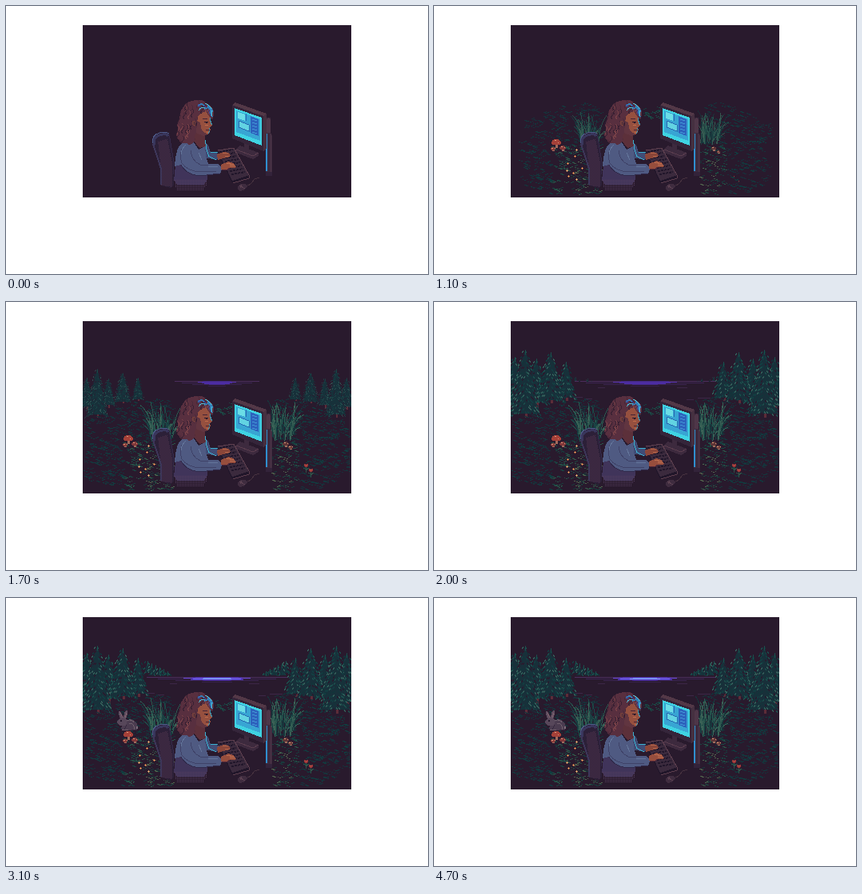
Write an HTML page that moves like this. It is 528x336 px and loops after 4.8 s.

```html
<!DOCTYPE html>
<html lang="en">
<head>
<meta charset="utf-8">
<title>Night work in the forest</title>
<style>
  html, body { margin: 0; width: 100%; height: 100%; overflow: hidden; background: #fff; }
  svg { display: block; width: 528px; height: 336px; }
</style>
</head>
<body>
<svg id="stage" viewBox="0 0 528 336" shape-rendering="crispEdges" fill="none">
  <defs>
    <clipPath id="panel"><path d="M96 24h336v216h-336z"/></clipPath>
    <clipPath id="hairClip"><path id="hairShape" d="M239 118C231 118 223 122 221 128C216 133 219 139 216 144C212 150 217 154 214 159C211 165 217 167 218 171C223 174 226 170 229 174C236 173 237 168 236 163C240 158 237 152 239 148L240 139L244 134L250 132L257 142L259 140C262 133 259 127 254 124C249 119 245 117 239 118Z"/></clipPath>
    <pattern id="mesh" width="2" height="2" patternUnits="userSpaceOnUse">
      <path d="M0 0h1v1h-1zM1 1h1v1h-1z" fill="#4a3049"/>
    </pattern>
    <pattern id="fade" width="2" height="2" patternUnits="userSpaceOnUse">
      <path d="M0 0h1v1h-1z" fill="#57405f"/>
    </pattern>
  </defs>
  <g id="scene" clip-path="url(#panel)">
    <path d="M96 24h336v216h-336z" fill="#291a2d"/>
  </g>
</svg>
<script>
const LOOP = 4800, STEP = 100, MID = 264;
const scene = document.getElementById('scene');
const movers = [];

function add(tag, attrs, parent = scene) {
  const node = document.createElementNS('http://www.w3.org/2000/svg', tag);
  for (const key in attrs) node.setAttribute(key, attrs[key]);
  parent.appendChild(node);
  return node;
}
const group = (parent) => add('g', {}, parent);
const fill = (d, color, parent) => add('path', { d, fill: color }, parent);
const line = (d, color, parent, width = 1) =>
  add('path', { d, stroke: color, 'stroke-width': width }, parent);

let seed = 71;
function random(lo = 0, hi = 1) {
  seed = (seed * 16807) % 2147483647;
  return lo + (hi - lo) * seed / 2147483647;
}
const pick = (list) => list[Math.floor(random(0, list.length))];
const progress = (step, from, to) => Math.min(1, Math.max(0, (step - from) / (to - from)));

function reveal(node, from) {
  movers.push(step => node.setAttribute('display', step >= from ? 'inline' : 'none'));
  return node;
}
function grow(node, x, y, from, to) {
  movers.push(step => {
    const k = progress(step, from, to);
    node.setAttribute('display', k > 0 ? 'inline' : 'none');
    node.setAttribute('transform', `translate(${x} ${y}) scale(${k}) translate(${-x} ${-y})`);
  });
}
function shift(node, at) {
  movers.push(step => node.setAttribute('transform', `translate(${at(step)})`));
  return node;
}

// Lake light rows: [y, half width, colour]
function drawLake() {
  const band = (rows, spread, from) => {
    const parent = reveal(group(), from);
    for (const [y, half, color] of rows) {
      const bar = add('rect', { y, height: 1, fill: color }, parent);
      movers.push(step => {
        const ripple = half < 45 && step > 23 ? (step + y) % 3 : 0;
        const width = Math.round(half * spread(step)) + ripple;
        bar.setAttribute('x', MID - width);
        bar.setAttribute('width', width * 2);
      });
    }
  };
  const open = step => progress(step, 14, 19);
  band([[99, 88, '#4b2e5c'], [101, 74, '#3c2553'], [103, 52, '#3a2450'], [105, 18, '#352148']], open, 15);
  band([[99, 30, '#45298a'], [100, 40, '#4c2d9a'], [101, 32, '#4c2da5'], [102, 26, '#4c2da5'], [103, 16, '#45298a']], open, 16);
  band([[99, 26, '#5335a5'], [100, 40, '#6143c6'], [101, 30, '#6d64ee'], [102, 32, '#523ac2'], [103, 14, '#4b3195']],
    step => .55 + .45 * progress(step, 21, 24), 21);
  band([[100, 15, '#6f80ff'], [101, 18, '#86a4ff']], step => progress(step, 21, 24), 22);
  reveal(line('M172 119.5h14m3 2h9M330 120.5h16m-30 2h9M205 107.5h9m90 0h13', '#3c2747'), 18);
}

// Tiered conifer built from rows of drooping needles
function drawPine(x, top, base, half, from, to) {
  const tree = group(), height = base - top;
  if (half > 6) line(`M${x + 1} ${base - 4}v7`, '#5c2c38', tree, 3);
  const needles = { '#12343a': '', '#123f42': '', '#1b4f4c': '', '#34605a': '', '#291a2d': '' };
  const colors = Object.keys(needles);
  let left = `M${x} ${top}`, right = '';
  for (let y = top + 4; y <= base; y += 5) {
    const w = half * Math.pow((y - top) / height, .75);
    left += `L${x - w} ${y + 1}L${x - w * .7} ${y}`;
    right = `L${x + w * .7} ${y}L${x + w} ${y + 1}` + right;
    for (let dx = -w; dx < w; dx += 2.5) {
      const droop = Math.round(y - 5 + Math.abs(dx) * .25 + random(0, 3));
      needles[pick(colors)] += `M${Math.round(x + dx)} ${droop}l${dx < 0 ? -2 : 2} 3`;
    }
  }
  fill(left + right + 'Z', '#18303a', tree);
  for (const color of colors) line(needles[color], color, tree);
  line(`M${x + .5} ${top - 1}v6`, '#1b4f4c', tree);
  grow(tree, x, base + 3, from, to);
}

function drawTrees() {
  const pair = (x, ...rest) => {
    drawPine(x, ...rest);
    drawPine(527 - x, ...rest);
  };
  for (let n = 0; n < 6; n++) pair(177 + n * 5, 80 + n * 2.6, 98, 5, 18 + n % 3, 24);
  pair(165, 76, 121, 13, 14, 19);
  pair(128, 72, 130, 16, 14, 19);
  pair(146, 64, 124, 18, 14, 19);
  pair(101, 70, 132, 17, 14, 19);
  pair(114, 61, 142, 20, 12, 19);
}

function drawGround() {
  const batches = {};
  const mark = (x, y, color, step) => {
    const key = step + color;
    const batch = batches[key] ||= { d: '', color, step };
    batch.d += `M${x} ${y + .5}` + pick(['h2m1 1h2', 'h3m-1 1h3', 'h1m1 1h2m1 -1h1', 'm2 1h2m0 -1h2']);
  };
  for (let n = 0; n < 1150; n++) {
    const side = n % 2 ? 1 : -1;
    const d = random(54, 164), y = Math.round(random(121, 235));
    const x = Math.round(MID + side * d - (side < 0 ? 3 : 0));
    const top = 121 + Math.max(0, d - 96) * .42;
    const bottom = d < 118 ? 235 : 235 - (d - 118) * .3;
    if (y < top || y > bottom || (side > 0 && d < 66)) continue;
    const near = y > 173 && d < (side < 0 ? 117 : 98);
    const lush = near && d < 92 && y > 192;
    let step = d < 155 ? 7 + Math.floor(random(0, 6)) : 13 + Math.floor(random(0, 2));
    if (near && random() < .42) step = 1 + Math.floor(random(0, 6));
    const colors = lush ? ['#355547', '#52644d', '#1d4841', '#173a3c']
      : near ? ['#1a4742', '#173c3d', '#2b5448'] : ['#14343b', '#18303a', '#113c3f'];
    mark(x, y, pick(colors), step);
  }
  for (let n = 0; n < 22; n++)
    mark(Math.round(random(260, 281)), Math.round(random(125, 140)), pick(['#173c3f', '#1d4a45']), 9);
  for (const key in batches) reveal(line(batches[key].d, batches[key].color), batches[key].step);
}

function drawReeds() {
  for (const [x, lean] of [[194, -2], [346, 2]]) {
    const reeds = group();
    for (let n = 0; n < 60; n++) {
      const offset = random(-15, 15), height = random(12, 42);
      const bend = offset * .5 + random(-9, 9) + lean;
      line(`M${x + offset} ${random(163, 175)}q${bend * .1} ${-height * .7} ${bend} ${-height}`,
        pick(['#173d40', '#1f4a48', '#2b574e', '#3a6256', '#17353b']), reeds);
    }
    grow(reeds, x, 172, 6, 12);
  }
}

function drawMushroom(x, y, r, cap, from, to) {
  const g = group();
  fill(`M${x - 1} ${y}h3v${r}h-3z`, '#a06a5c', g);
  fill(`M${x - r} ${y + 1}q0 ${-r} ${r} ${-r}q${r} 0 ${r} ${r}l-2 1h${4 - 2 * r}z`, cap, g);
  fill(`M${x - 2} ${y - r + 2}h2v1h-2zM${x + 2} ${y - 1}h1v1h-1z`, '#cf9678', g);
  grow(g, x, y + r, from, to);
}

function drawFlowers() {
  const spots = [[178, 180], [167, 197], [176, 188], [166, 206], [174, 209], [168, 213], [178, 217], [185, 203]];
  spots.forEach(([x, y], n) => {
    const g = reveal(group(), 2 + n % 6);
    fill(`M${x - 1} ${y}h3v1h-3zM${x} ${y - 1}h1v3h-1z`, n % 3 ? '#c0683f' : '#c98f62', g);
    fill(`M${x} ${y}h1v1h-1z`, '#eabb78', g);
  });
  drawMushroom(153, 172, 6, '#a54038', 2, 9);
  drawMushroom(161, 178, 4, '#83383a', 4, 10);
  drawMushroom(149, 179, 3, '#8b3c3a', 7, 11);
  drawMushroom(350, 178, 4, '#5f3537', 7, 12);
  drawMushroom(356, 182, 3, '#6f3f3c', 8, 12);
  for (const [x, y] of [[375, 204], [381, 210]]) {
    const g = group();
    line(`M${x + .5} ${y + 2}v8m0 -4l-3 -2m3 3l3 -3`, '#2f5449', g);
    fill(`M${x - 2} ${y - 1}h2v1h1v-1h2v3h-1v1h-3v-1h-1z`, '#9c3739', g);
    fill(`M${x} ${y}h1v1h-1z`, '#cf7555', g);
    grow(g, x, y + 12, 9, 17);
  }
}

function drawRabbit() {
  const rabbit = reveal(group(), 21);
  fill('M149 155Q157 149 162 155Q166 160 164 166H145Q143 162 147 158Z', '#4b3c50', rabbit);
  fill('M139 155L143 150H149L152 154L150 160H143L140 158Z', '#57475a', rabbit);
  line('M154 158q5 -2 6 3v4M145 165h8M151 154q6 -3 9 2', '#6f5f6c', rabbit);
  line('M151 159l-3 6M157 165h7', '#35283d', rabbit);
  fill('M143 153h2v2h-2z', '#21172a', rabbit);
  fill('M163 161h2v3h-2z', '#7b6b78', rabbit);
  const ears = group(rabbit);
  fill('M143 151L141 145V142H143L147 150ZM147 151L148 144L150 141H152V145L150 152Z', '#5f4e60', ears);
  line('M143 144l3 6M150.5 144l-1 6', '#80636d', ears);
  movers.push(step => {
    const hop = Math.round(4 * (1 - progress(step, 21, 24)));
    rabbit.setAttribute('transform', `translate(0 ${hop})`);
    ears.setAttribute('transform', `translate(${step > 29 && step % 6 > 3 ? -1 : 0} ${step > 24 && step % 6 === 2 ? 1 : 0})`);
  });
}

function drawMonitor() {
  fill('M324 142L327 140H331V160L333 163V211L331 213H325Z', '#3d2a3e');
  fill('M326 142L328 140L331 142V159H326Z', '#4e3648');
  line('M326 160v47', '#2f8fcf', scene, 2);
  line('M331.5 160v51', '#4e3648');
  fill('M325 208h8v5h-8z', '#33233a');
  fill('M298 166L304 168V181L298 180Z', '#3d2a3e');
  fill('M287 180L293 175L316 184V188L309 192L288 184Z', '#3d2a3e');
  line('M288 180l21 8l7 -4', '#5a3d4e');
  fill('M283 124L287 121L326 135V179L322 182L283 166Z', '#35253a');
  fill('M283 124L287 121L326 135L322 138Z', '#533847');
  fill('M322 138L326 135V179L322 182Z', '#453040');
  fill('M286 128L320 140V175L286 162Z', '#3fd3e2');
  fill('M288 131L318 142V169L288 158Z', '#38a5d3');
  fill('M290 133L299 136V144L290 141Z', '#6bdde6');
  fill('M291 144L304 149V157L291 152Z', '#62d3e2');
  fill('M306 138L316 142V163L306 159Z', '#2d62bd');
  line('M291 144l13 5v8l-13 -5zM300 135v9', '#2768b1');
  line('M308 142l6 2m-6 2l6 2m-6 2l6 2m-6 2l6 2m-6 2l6 2', '#4298d6');
}

function drawDesk() {
  fill('M264 182L285 179L304 212V216L283 222Z', '#21162a');
  fill('M265 181L285 178L304 212L283 219Z', '#3b2a3d');
  for (let row = 0; row < 8; row++)
    add('path', { d: `M${267 + row * 2.2} ${183 + row * 4}l17 -3`, stroke: '#21162a', 'stroke-width': 2, 'stroke-dasharray': '3 1' });
  line('M265 181l20 -3l19 34v4l-20 6', '#5d3f4e');
  line('M299 225q4 1 7 -2t5 -6l6 -2', '#47323f');
  fill('M290 226L294 223H299L302 226L299 230L293 232L290 230Z', '#3f2c3f');
  line('M292 225l7 4M295 224l-2 4', '#5d4252');
}

function drawChair() {
  fill('M183 171Q182 162 192 159Q203 156 205 162L209 191L210 224L206 228L194 225L193 203Z', '#2c2038');
  fill('M190 170L202 166L208 198V227L194 225V204Z', 'url(#mesh)');
  line('M186 174Q183 165 192 162T203 163', '#39365c', scene, 3);
  line('M183.5 172Q182 162 192 159Q201 157 204 160', '#4d5987');
  line('M184 173L194 204V224', '#3d3659', scene, 2);
  line('M204.5 163L209 190V211', '#35294a');
}

function drawWoman() {
  const body = group();
  fill('M213 193L210 218L214 224H248L252 217L253 207L236 190Z', '#40345a', body);
  fill('M210 218L213 230L218 232H246L251 224V217Z', 'url(#fade)', body);
  fill('M247 170L253 174L256 183L267 185L268 190L263 193L249 190Z', '#414c75', body);
  fill('M227 167L217 175Q212 183 211 201L219 199Q225 211 242 213L268 210L271 203L265 198L253 198L250 188L249 176L241 180L235 171Z', '#4f5a82', body);
  line('M220 179q-3 10 0 18q7 10 23 11l20 -1M231 181q1 13 12 18l10 1', '#3f4268', body);
  line('M219 199Q225 211 242 213L268 210', '#302a4b', body);
  line('M225 174q-6 6 -6 12M241 184l4 9M253 202l12 -1', '#64769b', body);
  fill('M237 159L249 161L249 169L250 176L242 178L235 169Z', '#5c303a', body);
  line('M249.5 168l1 10l3 10l9 5M256 183l9 1', '#3bb2d1', body);

  const typing = [0, 1, 0, 0, -1, 0];
  const far = shift(group(), step => `0 ${typing[step % 6]}`);
  fill('M264 186L272 183L279 184L281 188L277 190L271 191L265 193Z', '#8b4639', far);
  line('M271 184l7 1M274 188h6', '#b3654a', far);
  const near = shift(group(), step => `0 ${-typing[(step + 2) % 6]}`);
  fill('M269 199L278 195L285 197L288 202L285 203L280 203L276 206L269 205Z', '#974e3d', near);
  line('M276 197l9 2M280 200h7', '#bd6e50', near);
  line('M270 205l6 1l4 -3', '#55293a', near);

  const head = group();
  fill('M238 139L250 131L255 136L255 142L258 150L255 152L256 155L254 160L247 163L238 159Z', '#96503f', head);
  fill('M238 143L243 146L245 156L252 161L247 163L238 159Z', '#613540', head);
  line('M255.5 137v6l2 6M254 153l1 3l-2 4', '#4095ad', head);
  line('M246 142l6 -1M250 155h5', '#452436', head);
  fill('M248 145h5v1h-5zM250 146h2v1h-2z', '#2b1a2d', head);
  fill('M249 149h4v1h-4zM251 158h2v1h-2z', '#c06c4b', head);
  const glance = fill('M251 145h2v1h-2z', '#8de2df', head);
  movers.push(step => glance.setAttribute('display', step > 22 && step < 29 ? 'inline' : 'none'));

  fill(document.getElementById('hairShape').getAttribute('d'), '#582f3f', head);
  const curls = add('g', { 'clip-path': 'url(#hairClip)' }, head);
  for (let n = 0; n < 52; n++) {
    const x = Math.round(random(212, 257)), y = Math.round(random(116, 168));
    line(`M${x} ${y}q3 2 1 5q-4 3 -1 6`, pick(['#382032', '#382032', '#4a283a', '#7a4248']), curls);
  }
  line('M240 125q6 -4 9 1M248 129q6 -4 8 2q-1 4 2 8M252 125q6 2 6 8', '#327fb8', curls, 2);
  line('M241 131q4 -6 8 -3M249 122q6 2 8 7M257 131l1 7', '#51c2d5', curls);
  line('M240 123l4 5m3 -5l4 5M253 130l3 7', '#453b86', curls);
  fill('M233 144h4v5l-2 2l-2 -2z', '#743f3c', head);
  line('M235 145v4', '#462a38', head);
}

drawLake();
drawTrees();
drawGround();
drawReeds();
drawFlowers();
drawRabbit();
drawMonitor();
drawDesk();
drawChair();
drawWoman();

const started = performance.now();
let shown = -1;
function frame(now) {
  const step = Math.floor((Math.max(0, now - started) % LOOP) / STEP);
  if (step !== shown) {
    for (const move of movers) move(step);
    shown = step;
  }
  requestAnimationFrame(frame);
}
frame(started);
</script>
</body>
</html>
```
